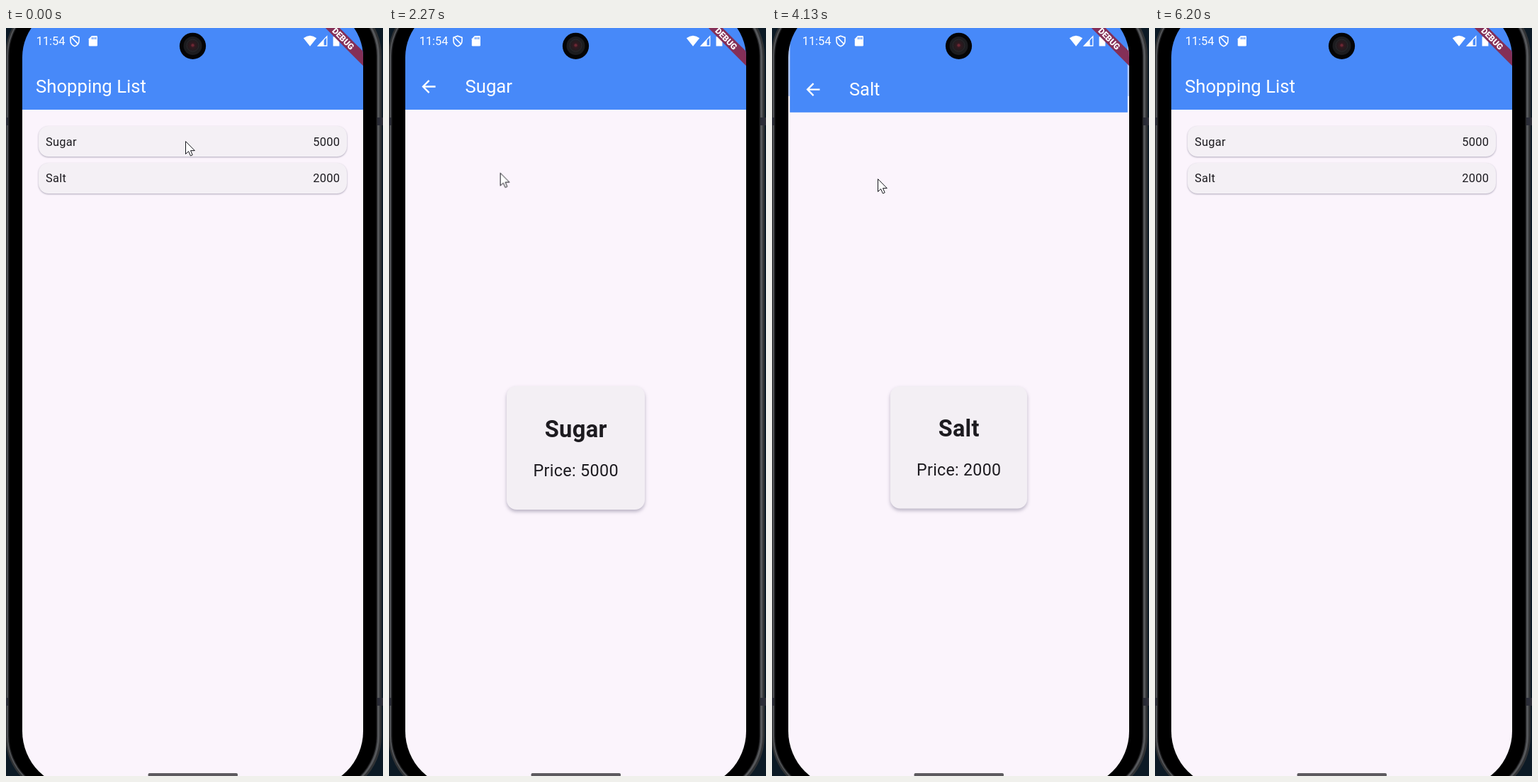
Animation, 532 px wide and 1053 px high, one loop 6.23 s. Source, as an HTML page:

```html
<!DOCTYPE html>
<html lang="en">
<head>
<meta charset="utf-8">
<title>Shopping List</title>
<style>
  html, body { margin: 0; width: 100%; height: 100%; overflow: hidden; background: #0c1a25; }
  svg { display: block; width: 100vw; height: 100vh; font-family: Roboto, sans-serif; }

  .surface { fill: #fbf4fc; }
  .bar { fill: #4789f9; }
  .title { font-size: 25.7px; fill: #fff; }
  .item { font-size: 16.4px; letter-spacing: .29px; fill: #1d1b20; }
  .name { font-size: 32.7px; font-weight: 700; letter-spacing: .29px; fill: #1d1b20; }
  .price { font-size: 23.4px; letter-spacing: .29px; fill: #1d1b20; }
  .end { text-anchor: end; }
  .mid { text-anchor: middle; }
  .tile { fill: #f4f0f5; filter: drop-shadow(0 1px 1.1px rgba(50, 45, 80, .38)); }
  .card { fill: #f3eff4; filter: drop-shadow(0 3px 2.6px rgba(50, 45, 80, .32)); }
  .ink { fill: rgba(0, 0, 0, .075); }

  .list, .page, .fade, .scrim, .ink, .cursor { animation: 6230ms linear infinite; }
  .list, .page { transform-origin: 263.5px 523px; }
  .list { animation-name: list; }
  .sugar { animation-name: sugar; }
  .salt { animation-name: salt; }
  .fade1 { animation-name: fade1; }
  .fade2 { animation-name: fade2; }
  .scrim { fill: #fbf4fc; animation-name: scrim; }
  .ink1 { animation-name: ink1; }
  .ink2 { animation-name: ink2; }
  .cursor { animation-name: cursor; }

  /* Page zoom: a slow first sixth, then a long settle */
  @keyframes sugar {
    0% { transform: scale(.85); }
    2% { transform: scale(.85); animation-timing-function: cubic-bezier(.05, 0, .1333, .06); }
    2.81% { transform: scale(.91); animation-timing-function: cubic-bezier(.2083, .82, .25, 1); }
    6.82% { transform: scale(1); }
    47% { transform: scale(1); animation-timing-function: cubic-bezier(.05, 0, .1333, .06); }
    47.8% { transform: scale(.96); animation-timing-function: cubic-bezier(.2083, .82, .25, 1); }
    51.81%, 100% { transform: scale(.9); }
  }
  @keyframes salt {
    0% { transform: scale(.85); }
    63.88% { transform: scale(.85); animation-timing-function: cubic-bezier(.05, 0, .1333, .06); }
    64.69% { transform: scale(.91); animation-timing-function: cubic-bezier(.2083, .82, .25, 1); }
    68.7% { transform: scale(1); }
    90% { transform: scale(1); animation-timing-function: cubic-bezier(.05, 0, .1333, .06); }
    90.8% { transform: scale(.96); animation-timing-function: cubic-bezier(.2083, .82, .25, 1); }
    94.82%, 100% { transform: scale(.9); }
  }
  @keyframes list {
    0% { transform: scale(1); }
    2%, 63.88% { transform: scale(1); animation-timing-function: cubic-bezier(.05, 0, .1333, .06); }
    2.81%, 64.69% { transform: scale(1.02); animation-timing-function: cubic-bezier(.2083, .82, .25, 1); }
    6.82%, 46.9%, 68.7%, 89.9% { transform: scale(1.05); }
    47%, 90% { transform: scale(1.1); animation-timing-function: cubic-bezier(.05, 0, .1333, .06); }
    47.8%, 90.8% { transform: scale(1.06); animation-timing-function: cubic-bezier(.2083, .82, .25, 1); }
    51.81%, 94.82%, 100% { transform: scale(1); }
  }
  @keyframes fade1 {
    0%, 2.61% { opacity: 0; }
    3.21%, 47.4% { opacity: 1; }
    48%, 100% { opacity: 0; }
  }
  @keyframes fade2 {
    0%, 64.49% { opacity: 0; }
    65.09%, 90.4% { opacity: 1; }
    91%, 100% { opacity: 0; }
  }
  @keyframes scrim {
    0%, 3% { opacity: 0; }
    4.01%, 6.82% { opacity: .6; }
    6.83%, 64.88% { opacity: 0; }
    65.89%, 68.7% { opacity: .6; }
    68.71%, 100% { opacity: 0; }
  }
  @keyframes ink1 {
    0%, .4% { opacity: 0; }
    1.4%, 52.6% { opacity: 1; }
    55.6%, 100% { opacity: 0; }
  }
  @keyframes ink2 {
    0%, 62.2% { opacity: 0; }
    63.2%, 95.3% { opacity: 1; }
    98.4%, 100% { opacity: 0; }
  }
  @keyframes cursor {
    0%, 2.4% { transform: translate(253px, 159px); animation-timing-function: ease-in-out; }
    9.15%, 26% { transform: translate(381px, 626px); animation-timing-function: ease-in-out; }
    36.44% { transform: translate(157px, 204px); animation-timing-function: ease-out; }
    42%, 52.6% { transform: translate(59px, 88px); animation-timing-function: ease-in-out; }
    60%, 68% { transform: translate(149px, 212px); animation-timing-function: ease-in-out; }
    76.57%, 80% { transform: translate(299px, 602px); animation-timing-function: ease-in-out; }
    88%, 92.5% { transform: translate(58px, 87px); animation-timing-function: ease-in; }
    98%, 99.99% { transform: translate(-30px, 60px); }
    100% { transform: translate(253px, 159px); }
  }
</style>
</head>
<body>
<svg viewBox="0 0 532 1053" preserveAspectRatio="none">
  <defs>
    <clipPath id="screen">
      <path d="M23 41A72 72 0 0 1 95 -31H432A72 72 0 0 1 504 41V990A80 80 0 0 1 424 1070H103A80 80 0 0 1 23 990Z"/>
    </clipPath>
    <radialGradient id="lens">
      <stop offset="0" stop-color="#5a2230"/>
      <stop offset=".4" stop-color="#30191f"/>
      <stop offset="1" stop-color="#1d1c1f"/>
    </radialGradient>
    <g id="base">
      <rect class="surface" x="23" y="-13" width="481" height="1071"/>
      <rect class="bar" x="23" y="-13" width="481" height="128"/>
    </g>
    <path id="back" d="M65.6 82.5H48.2M56.6 73.9L48 82.5L56.6 91.1" fill="none" stroke="#fff" stroke-width="2.3"/>
    <rect id="panel" x="166" y="504" width="195" height="174" rx="14"/>
    <rect id="row" x="46" y="138" width="435" height="43" rx="14"/>
  </defs>

  <!-- phone body -->
  <rect width="532" height="1053" fill="#0c1a25"/>
  <rect x="-1" y="-45" width="531" height="1126" rx="84" fill="#303234"/>
  <rect x="1.2" y="-42.5" width="526" height="1121" rx="82" fill="#55575a"/>
  <rect x="3" y="-41" width="521" height="1118" rx="80" fill="#202123"/>
  <rect x="4.5" y="-40" width="518" height="1116" rx="79" fill="#000"/>
  <path d="M0 126H3V137H0ZM524 126H532V137H524ZM0 943H3V954H0ZM524 943H532V954H524Z" fill="#2b2d37"/>

  <g clip-path="url(#screen)">
    <g class="list">
      <use href="#base"/>
      <text class="title" x="42" y="91">Shopping List</text>
      <rect class="ink ink1" x="42" y="134" width="443" height="51"/>
      <rect class="ink ink2" x="42" y="186" width="443" height="51"/>
      <use href="#row" class="tile"/>
      <use href="#row" class="tile" y="52"/>
      <text class="item" x="56" y="166">Sugar</text>
      <text class="item end" x="471.3" y="166">5000</text>
      <text class="item" x="56" y="217">Salt</text>
      <text class="item end" x="471.3" y="217">2000</text>
    </g>

    <rect class="scrim" x="23" y="-13" width="481" height="1071"/>

    <g class="fade fade1">
      <g class="page sugar">
        <use href="#base"/>
        <use href="#back"/>
        <text class="title" x="107.5" y="91">Sugar</text>
        <use href="#panel" class="card"/>
        <text class="name mid" x="263.7" y="575.8">Sugar</text>
        <text class="price mid" x="263.7" y="631">Price: 5000</text>
      </g>
    </g>

    <g class="fade fade2">
      <g class="page salt">
        <use href="#base"/>
        <use href="#back"/>
        <text class="title" x="107.5" y="91">Salt</text>
        <use href="#panel" class="card"/>
        <text class="name mid" x="263.7" y="575.8">Salt</text>
        <text class="price mid" x="263.7" y="631">Price: 2000</text>
      </g>
    </g>

    <!-- status bar -->
    <text x="42.7" y="24" font-size="16.4" fill="#fff">11:54</text>
    <path d="M97 11.2L103 13.4V18C103 21.6 100.4 24.4 97 25.7C93.6 24.4 91 21.6 91 18V13.4ZM93 13.8L101.6 22.6" fill="none" stroke="#fff" stroke-width="1.6"/>
    <path d="M121 11H127.6Q129 11 129 12.4V24.2Q129 25.6 127.6 25.6H118.2Q116.8 25.6 116.8 24.2V15.2Z" fill="#fff"/>
    <path d="M121.6 13V16M124.2 13V16M126.7 13V16" stroke="#4789f9" stroke-width="1.3"/>
    <path d="M429 25.8L419.8 14.2Q429 7.2 438.2 14.2Z" fill="#fff"/>
    <path d="M452.8 11.8V25H440.4Z" fill="none" stroke="#fff" stroke-width="1.3"/>
    <path d="M448.6 16V25.6H439.4Z" fill="#fff"/>
    <path d="M464 10.8H468V12.3H470.4V25.6H461.6V12.3H464Z" fill="#fff"/>

    <g transform="translate(504 -13) rotate(45)">
      <rect x="-50" y="32.6" width="100" height="14.2" fill="#842f57"/>
      <text class="mid" y="44" font-size="11.9" font-weight="900" fill="#fff">DEBUG</text>
    </g>

    <rect x="200.5" y="1049" width="126.5" height="5" rx="2" fill="#5d5a5f"/>
  </g>

  <!-- camera -->
  <circle cx="263.5" cy="25.3" r="18.6" fill="#050506"/>
  <circle cx="263.5" cy="25" r="13" fill="#1c1c1f"/>
  <circle cx="263.5" cy="24.6" r="8.5" fill="url(#lens)" stroke="#2c2a2d"/>
  <circle cx="263.5" cy="24.2" r="2" fill="#6b2733"/>

  <g class="cursor">
    <path d="M.5 .6V18.4L4.6 14.6L7.4 20.9L10.2 19.7L7.5 13.6H13.3Z" fill="#fff" stroke="#15151c"/>
  </g>
</svg>
</body>
</html>
```
